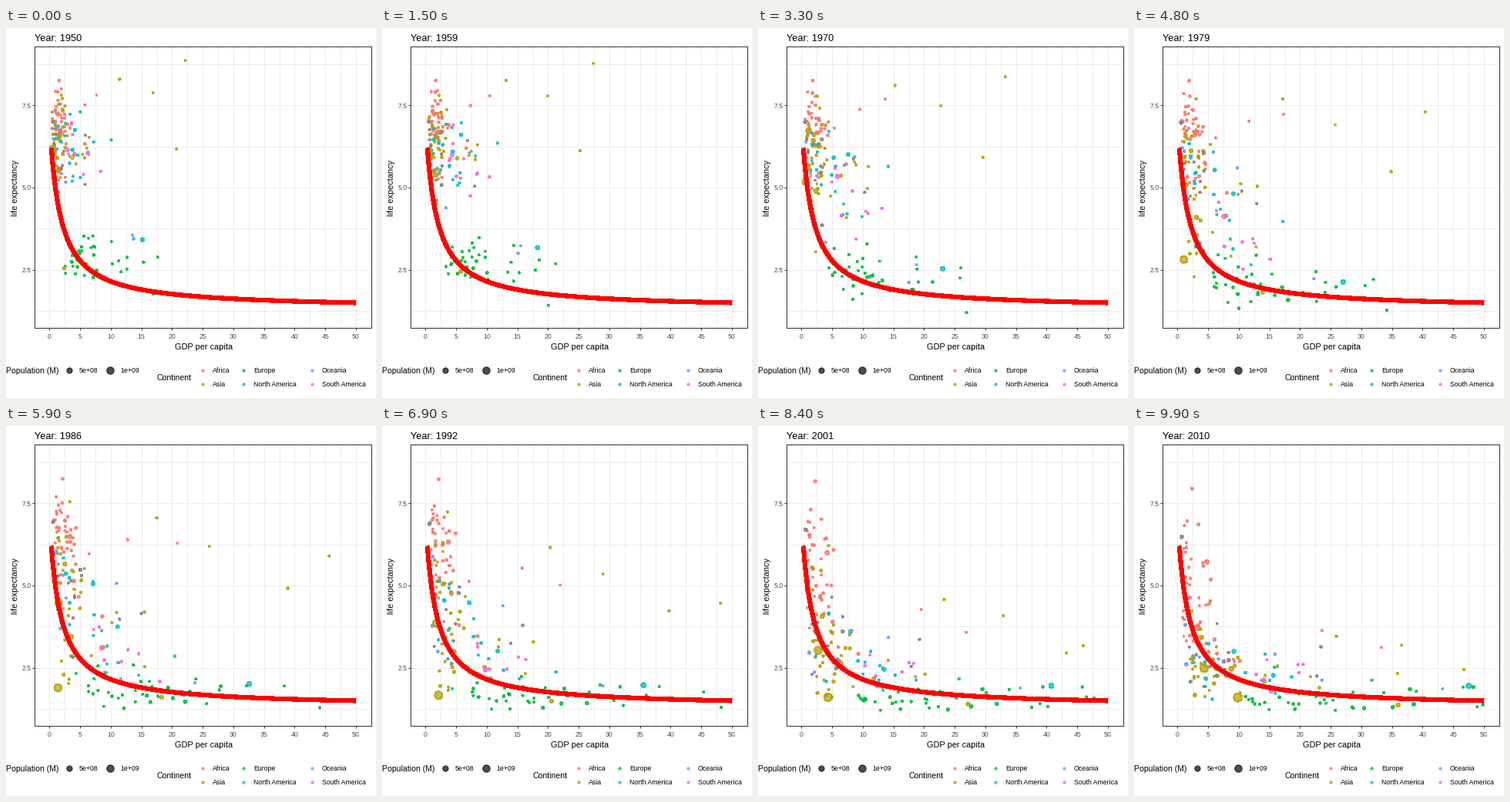
Recreate the animation shown at these times as a matplotlib script. Size 480 by 480 pixels, loop 10000 ms.

```python
import numpy as np
import matplotlib.pyplot as plt
from matplotlib.animation import FuncAnimation
from matplotlib.patches import Rectangle

SIZE, FRAMES, LOOP = 480, 100, 10000
START, END = 1950, 2010
LEFT, RIGHT, TOP, BOTTOM = 37, 474, 24, 389
GRID, DARK, GREY = "#EBEBEB", "#333333", "#4D4D4D"

COLORS = {
    "Africa": "#F8766D", "Asia": "#B79F00", "Europe": "#00BA38",
    "North America": "#00BFC4", "Oceania": "#619CFF",
    "South America": "#F564E3", "Other": "#7F7F7F",
}

# count, first income, last income, log spread,
# high fertility, low fertility, year of transition, its spread
GROUPS = [
    ("Africa", 44, 1.4, 2.2, .65, 6.8, 3.1, 2008, 13),
    ("Africa", 3, 5, 17, .5, 7, 3, 1992, 4),
    ("Asia", 38, 1.9, 6, .75, 6.4, 2.1, 1987, 12),
    ("Asia", 4, 14, 33, .35, 7.4, 2.3, 1995, 6),
    ("Europe", 35, 5.5, 23, .52, 3, 1.5, 1971, 8),
    ("North America", 18, 2.8, 9, .6, 6.2, 2.2, 1980, 9),
    ("Oceania", 8, 2, 4, .6, 6.3, 2.8, 1988, 12),
    ("Oceania", 2, 13, 34, .1, 3.6, 1.9, 1968, 2),
    ("South America", 9, 3.5, 11, .4, 5.9, 2.2, 1980, 7),
    ("Other", 12, 2, 8, .8, 5.8, 2.3, 1986, 13),
]

# population (M), first income, last income, pace of growth,
# high fertility, low fertility, year of transition, its width
GIANTS = [
    ("Africa", 160, 1.8, 5, 1, 6.7, 5.5, 1998, 8),
    ("Africa", 50, 6, 10, .8, 6.4, 2.6, 1982, 8),
    ("Asia", 240, 1.4, 8.5, 1.2, 5.6, 2.4, 1980, 8),
    ("Asia", 170, 1.5, 4, 1.2, 6.6, 3, 1994, 8),
    ("Asia", 127, 2.5, 36, .6, 2.6, 1.35, 1975, 8),
    ("Europe", 82, 7, 40, .8, 2.3, 1.4, 1971, 6),
    ("Europe", 62, 7.8, 36.5, 1, 2.5, 1.85, 1970, 6),
    ("Europe", 60, 4.7, 36, .7, 2.6, 1.3, 1978, 6),
    ("North America", 310, 15.2, 49.5, .9, 3.5, 1.95, 1967, 6),
    ("North America", 115, 4.2, 16.2, .7, 6.8, 2.2, 1981, 7),
    ("South America", 195, 3, 14.7, .8, 6.2, 1.75, 1980, 7),
    ("Other", 65, .5, .7, 1, 7, 6.2, 2005, 8),
    ("Asia", 1200, .6, 4.5, 1.6, 6.1, 2, 1990, 10),
    ("Asia", 1350, .5, 9.5, 2, 6.2, 1.6, 1975, 4),
]

rng = np.random.default_rng(12)


def to_x(gdp):
    return 56.45 + 7.95 * gdp


def to_y(fert):
    return 420.5 - 42.7 * fert


def radius(pop):
    """Dot radius in pixels, population in millions."""
    return 1.1 + 4.5 * np.sqrt(np.asarray(pop) / 1350)


def normal():
    return np.clip(rng.normal(), -2.2, 2.2)


def small_country(name, n, first, last, spread, high, low, mid, mid_spread):
    """Random member of a group; richer ones change earlier."""
    wealth = normal()
    scale = np.exp(spread * wealth)
    pop = min(np.exp(1.9 + 1.4 * normal()), 120)
    return (name, pop, first * scale, last * scale * np.exp(.2 * normal()),
            rng.uniform(.7, 1.2), high * (1 + .1 * normal()),
            low * (1 + .14 * normal()), mid + mid_spread * normal() - 4 * wealth,
            rng.uniform(5, 10))


countries = [small_country(*g) for g in GROUPS for _ in range(g[1])] + GIANTS
dot_colors = [COLORS[c[0]] for c in countries]
POP, FIRST, LAST, PACE, HIGH, LOW, MID, WIDTH = np.array([c[1:] for c in countries]).T
PHASE = rng.uniform(0, 2 * np.pi, len(countries))


def state(year):
    """Positions and radii of all dots: exponential income, logistic fertility."""
    u = (year - START) / (END - START)
    gdp = FIRST * (LAST / FIRST) ** u ** PACE
    gdp = gdp * (1 + .04 * np.sin(.6 * year + PHASE))
    gdp = np.where(gdp > 50, 2500 / gdp, np.maximum(gdp, .35))
    fert = LOW + (HIGH - LOW) / (1 + np.exp((year - MID) / WIDTH))
    fert = 1.2 + abs(fert - 1.2)
    return np.column_stack([to_x(gdp), to_y(fert)]), radius(POP * (.42 + .58 * u))


plt.rcParams["font.family"] = "Liberation Sans"
fig = plt.figure(figsize=(SIZE / 72, SIZE / 72), dpi=72, facecolor="white")
ax = fig.add_axes([0, 0, 1, 1])
ax.set_xlim(0, SIZE)
ax.set_ylim(SIZE, 0)
ax.axis("off")


def line(x, y, color, width=1, z=1, **kw):
    ax.plot(x, y, color=color, lw=width, zorder=z, solid_capstyle="butt", **kw)


def label(x, y, s, size=8.8, color="black", **kw):
    return ax.text(x, y, s, fontsize=size, color=color, **kw)


def area(r):
    return (2 * r - .4) ** 2


def dots(xy, r, colors):
    x, y = np.transpose(xy)
    return ax.scatter(x, y, s=area(r), c=colors, edgecolors=colors,
                      linewidths=1, alpha=.7, zorder=3, antialiased=False)


# panel
for k in range(21):
    line([to_x(2.5 * k)] * 2, (TOP, BOTTOM), GRID)
for k in range(1, 8):
    line((LEFT, RIGHT), [to_y(1.25 * k)] * 2, GRID)
ax.add_patch(Rectangle((LEFT, TOP), RIGHT - LEFT, BOTTOM - TOP,
                       fill=False, ec=DARK, lw=1, zorder=5))

# axes
for v in range(0, 51, 5):
    line([to_x(v)] * 2, (BOTTOM, BOTTOM + 3), DARK, z=5)
    label(to_x(v), 403, str(v), color=GREY, ha="center")
for v in (2.5, 5.0, 7.5):
    line((LEFT - 3, LEFT), [to_y(v)] * 2, DARK, z=5)
    label(33, to_y(v) + 3.5, f"{v:.1f}", color=GREY, ha="right")
label(256.5, 417, "GDP per capita", 11, ha="center")
label(12.5, 207, "life expectancy", 11, rotation=90, ha="center", va="center")

# legends
label(-.5, 448, "Population (M)", 10.5)
for x, pop, s in ((81, 500, "5e+08"), (134, 1000, "1e+09")):
    dots([(x + .5, 443.5)], radius(pop), ["black"])
    label(x + 14, 447, s)
label(195, 457, "Continent", 10.5)
for k, name in enumerate(list(COLORS)[:6]):
    x, y = (254, 307, 396)[k // 2], 443 + 18 * (k % 2)
    dots([(x + .5, y + .5)], 1.9, [COLORS[name]])
    label(x + 14, y + 4, name)

# fitted curve
gdp = np.linspace(.3, 50, 400)
line(to_x(gdp), to_y(1.309 + 9.87 / (gdp + 1.72)), "red", 5.2, 4, antialiased=False)

title = label(37, 17, "", 12.7)
cloud = dots(*state(START), dot_colors)


def update(i):
    year = START + (END - START) * i / (FRAMES - 1)
    xy, r = state(year)
    cloud.set_offsets(xy)
    cloud.set_sizes(area(r))
    title.set_text(f"Year: {round(year)}")
    return cloud, title


anim = FuncAnimation(fig, update, frames=FRAMES, interval=LOOP / FRAMES,
                     repeat=True, repeat_delay=0)
plt.show()
```
